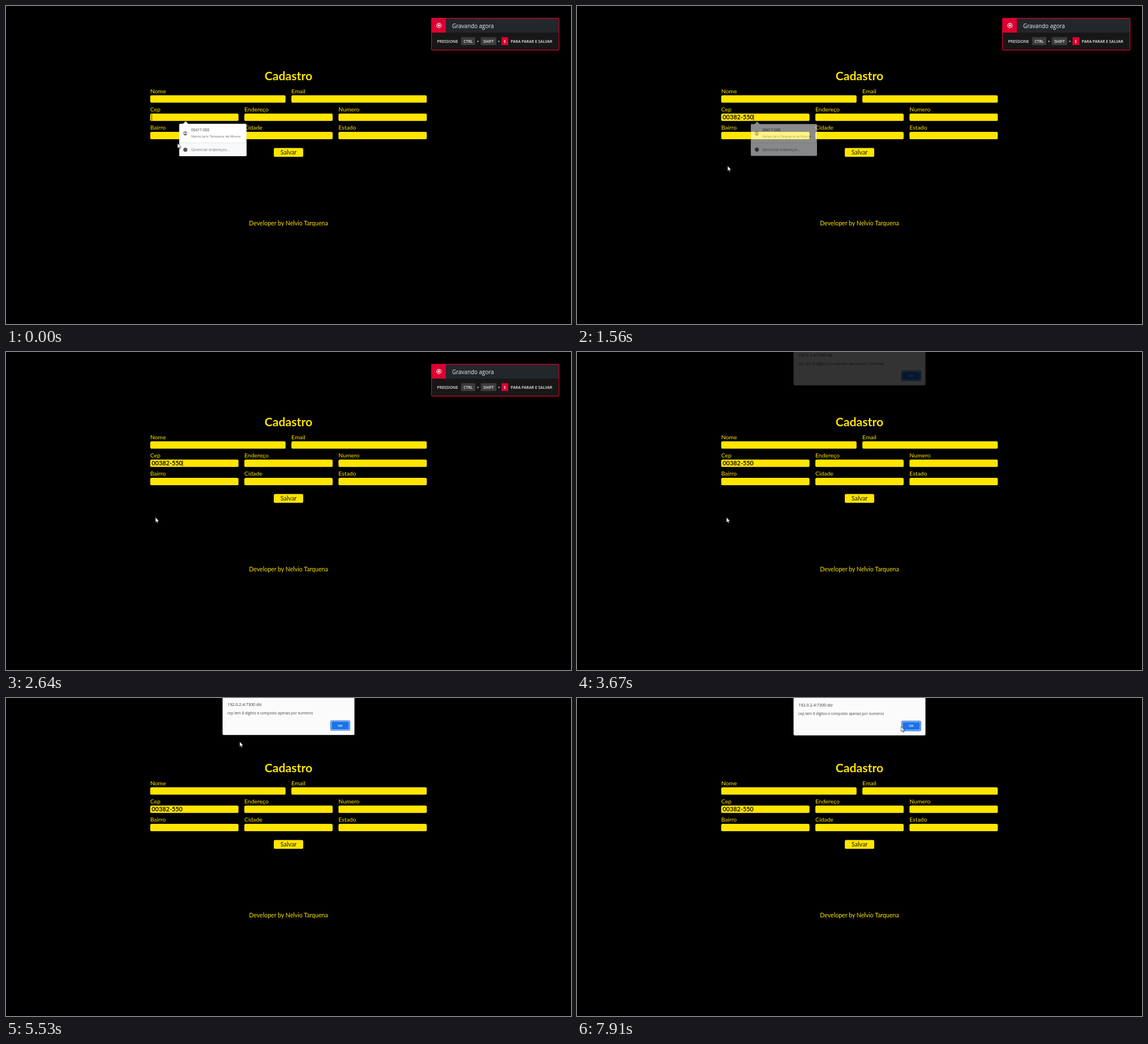
An HTML page for the animation above (8000 ms loop, 998x561 px).

```html
<!DOCTYPE html>
<html lang="pt-BR">
<head>
<meta charset="utf-8">
<title>Cadastro</title>
<style>
  html, body { margin: 0; width: 100%; height: 100%; overflow: hidden; background: #000; }
  svg { display: block; width: 100%; height: 100%; }
  text { white-space: pre; }
  .form { font-family: Lato, "Open Sans", sans-serif; font-size: 10.4px; }
  .ui { font-family: "Open Sans", "Noto Sans", sans-serif; }
  .mid { text-anchor: middle; }
</style>
</head>
<body>
<svg id="stage" viewBox="0 0 998 561"></svg>
<script>
const LOOP = 8000;
const YELLOW = '#ffe500', RED = '#dc0032';
const CEP = '00382-550';
const stage = document.getElementById('stage');

function add(parent, tag, attrs, content) {
  const node = document.createElementNS('http://www.w3.org/2000/svg', tag);
  for (const key in attrs) node.setAttribute(key, attrs[key]);
  if (content) node.textContent = content;
  parent.appendChild(node);
  return node;
}
const group = (cls = '') => add(stage, 'g', { class: cls });
const box = (parent, x, y, width, height, fill, rx = 0, more = {}) =>
  add(parent, 'rect', { x, y, width, height, fill, rx, ...more });
const label = (parent, x, y, content, fill, size, more = {}) =>
  add(parent, 'text', { x, y, fill, ...(size && { 'font-size': size }), ...more }, content);

// Registration form
const form = group('form');
const centered = { class: 'mid' };
label(form, 499, 131, 'Cadastro', YELLOW, 21.2, { ...centered, 'font-weight': 700 });

function fieldRow(top, width, names) {
  names.forEach((name, i) => {
    const x = 254.7 + i * (width + 10.3);
    label(form, x, top - 3.6, name, YELLOW);
    box(form, x, top, width, 13, YELLOW, 2.6);
  });
}
fieldRow(157.5, 239.1, ['Nome', 'Email']);
fieldRow(189.8, 156, ['Cep', 'Endereço', 'Numero']);
fieldRow(222, 156, ['Bairro', 'Cidade', 'Estado']);

box(form, 473, 250.4, 52, 15.6, YELLOW, 2.6);
label(form, 499, 262, 'Salvar', '#1c1a00', 10.9, centered);
label(form, 499, 386.7, 'Developer by Nelvio Tarquena', YELLOW, 10.6, centered);
const cepText = label(form, 257.3, 200, CEP, '#141200', 10.9, { 'font-weight': 700 });
const caret = box(form, 257, 191, 0.8, 11, '#1c1a00');

// Autofill suggestions
const popup = group('ui');
add(popup, 'path', { d: 'M312 208.5L317.3 203.3L322.6 208.5Z', fill: '#fff' });
box(popup, 306, 207.8, 118.8, 57, '#fff', 1.5);
box(popup, 306, 241.5, 118.8, 23.3, '#f8f9fb', 1.5);
box(popup, 306, 241, 118.8, 0.7, '#d9dce0');
label(popup, 327, 221.2, '00417-000', '#333', 6.6);
label(popup, 327, 232.2, 'Nelvio Jaris Tarquena de Moura', '#666', 6);
label(popup, 327, 256, 'Gerenciar endereços...', '#777', 6.5);
add(popup, 'circle', { cx: 316.6, cy: 224.5, r: 3.3, fill: 'none', stroke: '#444', 'stroke-width': 0.8 });
add(popup, 'circle', { cx: 316.6, cy: 223.6, r: 1.2, fill: '#444' });
add(popup, 'path', { d: 'M314.3 226.9Q316.6 224.6 318.9 226.9Q316.6 228.8 314.3 226.9Z', fill: '#444' });
add(popup, 'circle', { cx: 316.8, cy: 253.6, r: 3.6, fill: '#555' });

// Recording notice
const notice = group('ui');
box(notice, 751.6, 21.6, 225.2, 56.2, '#171717', 1.5);
box(notice, 777, 22, 199.5, 25, '#22272a');
box(notice, 752, 22, 25, 25, RED);
box(notice, 751.6, 21.6, 225.2, 56.2, 'none', 1.5, { stroke: RED, 'stroke-width': 1.2 });
add(notice, 'circle', { cx: 764.7, cy: 34.4, r: 3.8, fill: 'none', stroke: '#fff', 'stroke-width': 1.1 });
add(notice, 'circle', { cx: 764.7, cy: 34.4, r: 1.8, fill: '#fff' });
label(notice, 788, 38.8, 'Gravando agora', '#f2f2f2', 9.9, { 'font-weight': 500 });
const hint = (x, content, more) =>
  label(notice, x, 64.8, content, '#eee', 6.9, { 'font-weight': 600, ...more });
function keyCap(x, width, name, fill) {
  box(notice, x, 55, width, 14, fill, 0.8);
  hint(x + width / 2, name, centered);
}
hint(761.5, 'PRESSIONE');
keyCap(803.7, 25.3, 'CTRL', '#3b3b3b');
hint(833.6, '+', centered);
keyCap(838.6, 27.4, 'SHIFT', '#3b3b3b');
hint(870.7, '+', centered);
keyCap(875.3, 11.8, 'E', RED);
hint(891.6, 'PARA PARAR E SALVAR');

// Alert dialog
const dialog = group('ui');
box(dialog, 382.5, -20, 233, 85.3, '#fbfbfc', 2);
label(dialog, 391, 14.4, '192.0.2.4:7300 diz', '#333', 7.25);
label(dialog, 391, 29.2, 'cep tem 8 digitos e composto apenas por numeros', '#444', 6.4);
box(dialog, 573.6, 40, 33.6, 17, '#cfe2fb', 2, { stroke: '#1a66cf', 'stroke-width': 1.2 });
box(dialog, 575.2, 41.6, 30.4, 13.8, '#1a73e8', 1.2);
label(dialog, 590.3, 50.6, 'OK', '#fff', 6, { ...centered, 'font-weight': 600 });

const pointer = add(stage, 'path', {
  d: 'M0 0V9.2L2.1 7.3L3.5 10.5L5 9.8L3.6 6.8H6.4Z',
  fill: '#fff', stroke: '#000', 'stroke-width': 0.6
});

// Each key is [time, ...values]; values are linear between keys.
function sample(keys, t) {
  const next = keys.findIndex(key => key[0] > t);
  if (next === 0) return keys[0].slice(1);
  if (next < 0) return keys[keys.length - 1].slice(1);
  const a = keys[next - 1], b = keys[next];
  const k = (t - a[0]) / (b[0] - a[0]);
  return a.slice(1).map((v, i) => v + (b[i + 1] - v) * k);
}

const PASTE = 1500, NOTICE_END = 3150, CARET_END = 3000;
const pointerPath = [
  [0, 303, 242], [820, 286, 261], [1560, 266, 282], [2400, 264, 291.6],
  [4370, 264, 291.6], [5110, 346, 168], [5530, 412.7, 77], [5930, 441, 51],
  [6790, 484, 46], [7630, 557, 49], [7910, 572.6, 50.2]
];
const popupFade = [[PASTE, 1], [1560, 0.54], [1660, 0.54], [1700, 0]];
// opacity, vertical offset
const dialogIn = [[3530, 0, -9], [3670, 0.2, -6.6], [3850, 1, 0], [6400, 1, 0], [6401, 1, 0.8]];

function show(node, visible) {
  node.setAttribute('visibility', visible ? 'visible' : 'hidden');
}

function render(t) {
  const pasted = t >= PASTE;
  show(cepText, pasted);
  show(caret, t < CARET_END && (pasted ? t - PASTE : t) % 1000 < 500);
  caret.setAttribute('x', pasted ? 311.6 : 257);

  const [popupAlpha] = sample(popupFade, t);
  const scale = 0.96 + 0.04 * popupAlpha;
  popup.setAttribute('opacity', popupAlpha);
  popup.setAttribute('transform', `translate(365.4 236) scale(${scale}) translate(-365.4 -236)`);

  show(notice, t < NOTICE_END);

  const [dialogAlpha, dialogY] = sample(dialogIn, t);
  dialog.setAttribute('opacity', dialogAlpha);
  dialog.setAttribute('transform', `translate(0 ${dialogY})`);

  const [x, y] = sample(pointerPath, t);
  pointer.setAttribute('transform', `translate(${x} ${y})`);
}

const start = performance.now();
function tick() {
  render((performance.now() - start) % LOOP);
  requestAnimationFrame(tick);
}
tick();
</script>
</body>
</html>
```
